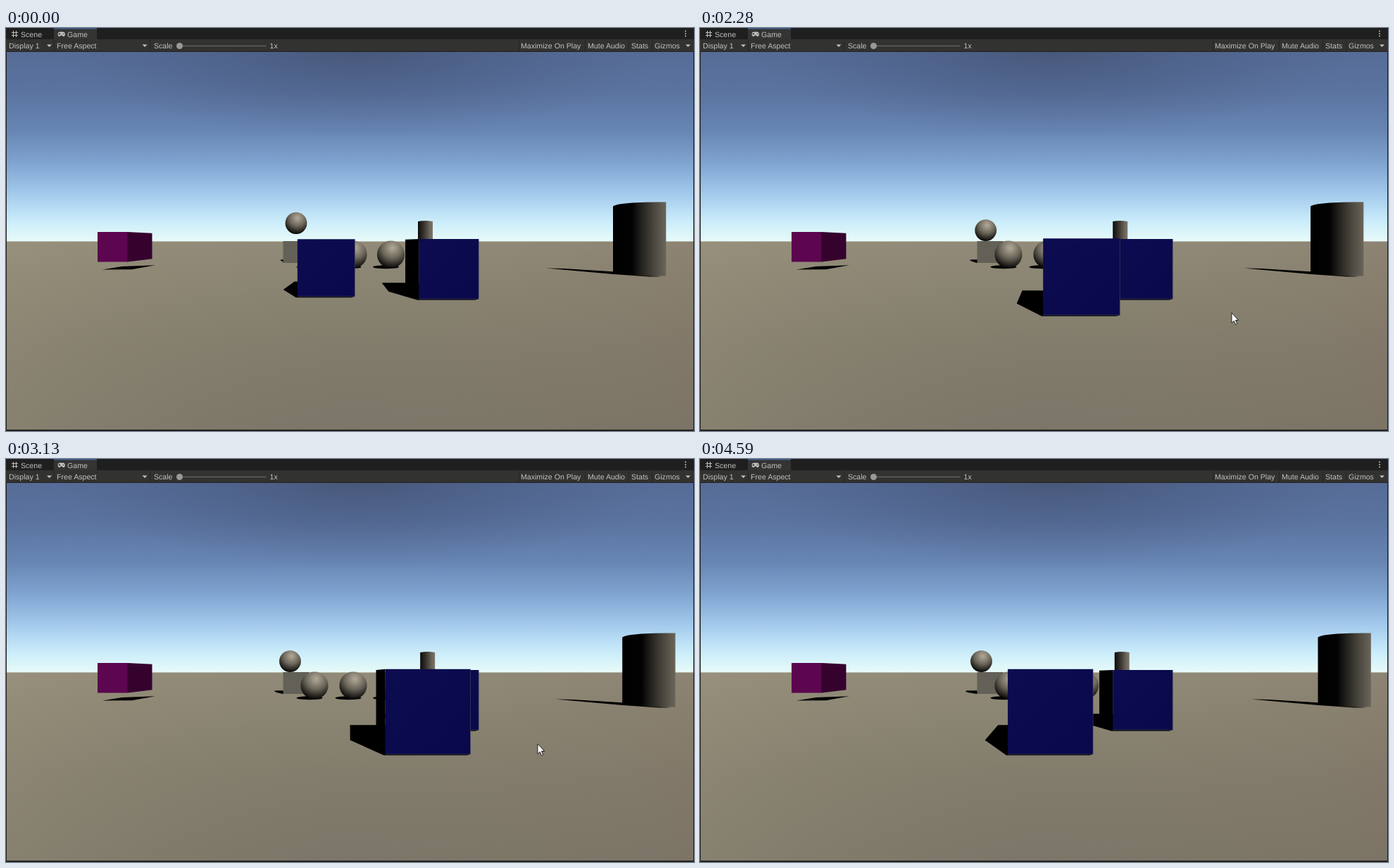
An HTML page for the animation above (4.67 s loop, 977x573 px).

```html
<!DOCTYPE html>
<html lang="en">
<head>
<meta charset="utf-8">
<title>Game view</title>
<style>
html, body { margin: 0; width: 100%; height: 100%; overflow: hidden; background: #1e1e1e; }
svg { display: block; width: 977px; height: 573px; }
text { font: 10.6px "Liberation Sans", Arial, sans-serif; fill: #c2c2c0; text-rendering: geometricPrecision; }
</style>
</head>
<body>
<svg viewBox="0 0 977 573" xmlns="http://www.w3.org/2000/svg">
<defs>
  <linearGradient id="sky" x2="0" y2="1">
    <stop offset="0" stop-color="#566c97"/>
    <stop offset=".2" stop-color="#5a739f"/>
    <stop offset=".42" stop-color="#6886b4"/>
    <stop offset=".6" stop-color="#82a7d3"/>
    <stop offset=".76" stop-color="#a6cdee"/>
    <stop offset=".9" stop-color="#cdeefb"/>
    <stop offset="1" stop-color="#e8fbf8"/>
  </linearGradient>
  <radialGradient id="zenith" gradientUnits="userSpaceOnUse" cx="0" cy="0" r="1" gradientTransform="translate(500 30) scale(430 125)">
    <stop offset="0" stop-color="#42506f" stop-opacity=".75"/>
    <stop offset=".5" stop-color="#46577c" stop-opacity=".4"/>
    <stop offset="1" stop-color="#4c6088" stop-opacity="0"/>
  </radialGradient>
  <linearGradient id="ground" x2="0" y2="1">
    <stop offset="0" stop-color="#928b79"/>
    <stop offset=".2" stop-color="#8b8573"/>
    <stop offset=".55" stop-color="#827c6c"/>
    <stop offset="1" stop-color="#7b7668"/>
  </linearGradient>
  <linearGradient id="warm">
    <stop offset="0" stop-color="#a59d84" stop-opacity=".28"/>
    <stop offset=".5" stop-color="#8b8472" stop-opacity="0"/>
    <stop offset="1" stop-color="#806c60" stop-opacity=".25"/>
  </linearGradient>
  <radialGradient id="ball" cx=".56" cy=".26" r=".76">
    <stop offset="0" stop-color="#b1a897"/>
    <stop offset=".2" stop-color="#978f80"/>
    <stop offset=".5" stop-color="#6a6559"/>
    <stop offset=".75" stop-color="#35322c"/>
    <stop offset=".95" stop-color="#0a0a08"/>
    <stop offset="1" stop-color="#050504"/>
  </radialGradient>
  <linearGradient id="tube">
    <stop offset="0" stop-color="#000"/>
    <stop offset=".36" stop-color="#020202"/>
    <stop offset=".55" stop-color="#26241f"/>
    <stop offset=".78" stop-color="#4c4840"/>
    <stop offset="1" stop-color="#6a655a"/>
  </linearGradient>
  <linearGradient id="pipe">
    <stop offset="0" stop-color="#0c0b0a"/>
    <stop offset=".4" stop-color="#37342e"/>
    <stop offset=".8" stop-color="#6c665a"/>
    <stop offset="1" stop-color="#7c7567"/>
  </linearGradient>
  <linearGradient id="navy" x2="1" y2="1">
    <stop offset="0" stop-color="#0d0c50"/>
    <stop offset="1" stop-color="#09084b"/>
  </linearGradient>
  <clipPath id="face"><path id="faceClip"/></clipPath>
</defs>

<rect y="34" width="977" height="270" fill="url(#sky)"/>
<rect y="34" width="977" height="130" fill="url(#zenith)"/>
<rect y="303.5" width="977" height="268" fill="url(#ground)"/>
<rect y="303.5" width="977" height="268" fill="url(#warm)"/>

<!-- violet box -->
<path d="M137 343.5L165 339L212 337.3L179 343.3Z"/>
<path d="M130 290H173V332.5H130Z" fill="#5b064f"/>
<path d="M172.5 290L207.5 291.7V328.3L172.5 332.5Z" fill="#35022e"/>

<!-- grey block with ball on top -->
<path id="blockShade"/>
<path d="M393.5 303H430.5V334H393.5Z" fill="#636157"/>
<circle id="drop" r="15.4" fill="url(#ball)"/>

<g id="row"></g>

<path id="pipeBody" d="M585 275Q595.500 273 606 275V304H585Z" fill="url(#pipe)"/>
<g id="tubeBody">
  <path d="M767 341.5L792 342L864 346.500L930 353.500L912 353.600L862 350Z"/>
  <path d="M862 253.500Q866 250 890 248.500T937.300 247.500V352.500Q895 353.500 862 348.500Z" fill="url(#tube)"/>
</g>

<g id="fixed"></g>
<g clip-path="url(#face)"><path id="cast"/></g>
<g id="mover"></g>

<path id="cursor" d="M0 0V14.300L3.300 11.400L5.500 16.600L7.700 15.600L5.500 10.500H9.600Z" fill="#fff" stroke="#111" stroke-width=".9"/>

<!-- editor chrome -->
<rect width="977" height="16" fill="#1f1f1f"/>
<rect x="68" width="61" height="16" fill="#343433"/>
<rect x="68" width="61" height="1.400" fill="#3d6296"/>
<rect y="16" width="977" height="18" fill="#323230"/>
<path d="M0 33.500H977M.5 34V573M976.500 34V573" stroke="#20201f"/>
<rect y="571" width="977" height="2" fill="#20201f"/>
<path d="M68.500 17V33M204.500 17V33M728.500 17V33M822.500 17V33M884.500 17V33M917.500 17V33" stroke="#252524"/>
<path d="M10.500 4V13M14.500 4V13M8 6.500H17M8 10.500H17" stroke="#bdbdbb" stroke-width="1.100"/>
<path d="M76 5.500H81.500A3.500 3.500 0 0 1 82 12Q80.500 12 79.800 10.500H77.700Q77 12 75.500 12A3.500 3.500 0 0 1 76 5.500Z" fill="#c2c2c0"/>
<path d="M74.500 8.500H77.500M76 7V10M80.500 8.500H82.500" stroke="#343433"/>
<path d="M58 23.500H65L61.500 27ZM193.500 23.500H200.500L197 27ZM965 23.500H972L968.500 27Z" fill="#c2c2c0"/>
<path d="M965 3.500v1.700M965 7v1.700M965 10.500v1.700" stroke="#c2c2c0" stroke-width="1.700"/>
<path d="M246 25.500H369.500" stroke="#60605e" stroke-width="1.300"/>
<circle cx="246.500" cy="25.500" r="4.500" fill="#999997"/>
<g id="labels"></g>
</svg>
<script>
const $ = id => document.getElementById(id);
const LOOP = 4670, STEPS = 61, STEP_S = .0765;
const HORIZON = 303.5, CX = 488, FOCAL = 466, DEPTH = 1.33, LIFT = .96;
const LIGHT = { x: -.41, z: .8 };   // shadow shift per unit of height
const FIXED = { x: 1.655, z: 5.48 };

const poly = pts => 'M' + pts.map(p => p[0].toFixed(2) + ' ' + p[1].toFixed(2)).join('L') + 'Z';

// world x, height above ground, depth -> stage
function project(x, h, z) {
  const s = FOCAL / z;
  return [CX + x * s, HORIZON + (LIFT - h) * s];
}

// piecewise linear value through [step, value] pairs
function track(keys, n) {
  if (n <= keys[0][0]) return keys[0][1];
  for (let i = 1; i < keys.length; i++) {
    const [a, u] = keys[i - 1], [b, v] = keys[i];
    if (n <= b) return u + (v - u) * (n - a) / (b - a);
  }
  return keys[keys.length - 1][1];
}

const front = (x, z) =>
  [project(x - .5, 1, z), project(x + .5, 1, z), project(x + .5, 0, z), project(x - .5, 0, z)];

function cube({ x, z }) {
  const l = x - .5, r = x + .5, far = z + DEPTH;
  const f = front(x, z), [tl, tr, br, bl] = f;
  const shade = poly([
    [br[0] - 5, br[1] + 1.6], [bl[0] - 2, bl[1] + 1.6],
    project(l + LIGHT.x, 0, z + LIGHT.z),
    project(l + LIGHT.x, 0, far + LIGHT.z),
    project(r + LIGHT.x, 0, far + LIGHT.z),
    project(r, 0, far), br
  ]);
  const side = l > 0
    ? `<path d="${poly([tl, project(l, 1, far), project(l, 0, far), bl])}"/>` : '';
  return `<path d="${shade}"/>${side}<path d="${poly(f)}" fill="url(#navy)"/>` +
    `<path d="M${tr}L${br}L${bl}" fill="none" stroke="#4b4a62" stroke-width=".6"/>`;
}

// shadow of the moving cube on the front of the fixed one
function castShadow({ x, z }) {
  const gap = FIXED.z - z - DEPTH;
  if (gap <= 0 || gap >= LIGHT.z) return '';
  const k = gap / LIGHT.z, dx = LIGHT.x * k, at = (px, h) => project(px, h, FIXED.z);
  return poly([at(x - .5 + dx, 1 - k), at(x + .5 + dx, 1 - k), at(x + .5 + dx, 0), at(x - .5 + LIGHT.x, 0)]);
}

const xKeys = [[26, -.41], [28, -.1], [30, .493], [34, 1.826], [37, 1.826], [41, .917], [45, .1], [48, -.062], [51, .079]];
const zKeys = [[26, 5.72], [29, 4.67], [30, 4.275], [31, 3.85]];
const slideKeys = [[26, 0], [30, 5], [36, 12.7], [41, 13.2], [48, 14.7], [60, 15.5]];
const pointerX = [[2, 950], [4, 850], [7, 755], [48, 755], [51, 758]];
const pointerY = [[2, 481], [4, 450], [7, 405], [48, 405], [50, 503], [51, 550]];

function draw(ms) {
  const n = Math.min(STEPS - 1, Math.floor((ms + 30) / 76.6)), t = n * STEP_S;

  const bx = 412 - 2.72 * t, by = Math.min(287.6, 277.5 + 152 * t * t);
  $('drop').setAttribute('cx', bx);
  $('drop').setAttribute('cy', by);
  const tip = bx - 23;
  $('blockShade').setAttribute('d', poly([[tip, 330], [tip + 3, 329.3], [400, 329.3], [400, 334], [393, 334], [tip + 4, 332]]));

  const slide = track(slideKeys, n);
  $('tubeBody').setAttribute('transform', `translate(${slide} 0)`);
  $('pipeBody').setAttribute('transform', `translate(${slide * .24} 0)`);

  const pos = { x: track(xKeys, n), z: track(zKeys, n) };
  $('mover').innerHTML = cube(pos);
  $('cast').setAttribute('d', castShadow(pos));

  $('cursor').setAttribute('visibility', n >= 2 && n <= 51 ? 'visible' : 'hidden');
  $('cursor').setAttribute('transform', `translate(${track(pointerX, n)} ${track(pointerY, n)})`);
}

$('row').innerHTML = [438, 493, 546.5].map(x =>
  `<ellipse cx="${x - 7}" cy="339.8" rx="18.500" ry="2.500"/><circle cx="${x}" cy="322" r="19.600" fill="url(#ball)"/>`).join('');
$('labels').innerHTML = [
  [21, 13, 'Scene'], [87, 13, 'Game'], [4, 29, 'Display 1'], [72, 29, 'Free Aspect'],
  [210, 29, 'Scale'], [374.5, 29, '1x'], [731, 29, 'Maximize On Play'],
  [826, 29, 'Mute Audio'], [888, 29, 'Stats'], [921, 29, 'Gizmos']
].map(([x, y, s]) => `<text x="${x}" y="${y}">${s}</text>`).join('');
$('fixed').innerHTML = cube(FIXED);
$('faceClip').setAttribute('d', poly(front(FIXED.x, FIXED.z)));

const start = performance.now();
function tick() {
  draw((performance.now() - start) % LOOP);
  requestAnimationFrame(tick);
}
tick();
</script>
</body>
</html>
```
